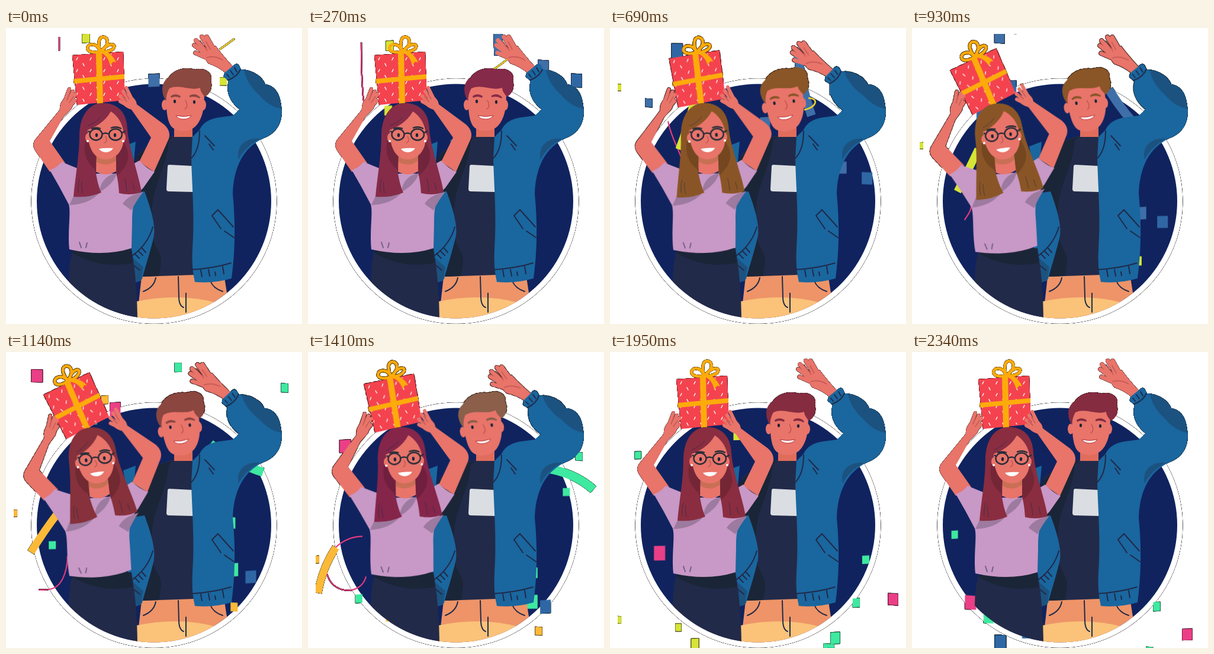
Write an HTML page that moves like this. It is 500 by 500 pixels and loops after 2370 ms.

```html
<!DOCTYPE html>
<html lang="en">
<head>
<meta charset="utf-8">
<title>Celebration</title>
<style>
html, body { margin: 0; width: 100%; height: 100%; overflow: hidden; background: #fff; }
svg { display: block; width: 500px; height: 500px; }
.scene { filter: drop-shadow(0 0 .5px #000) drop-shadow(0 0 .3px #000) drop-shadow(0 0 .2px #000); }

.skin { fill: #e8746a; }
.neck { fill: #e06c5c; }
.chin { fill: #c96f55; }
.crease { fill: none; stroke: #b9504e; stroke-width: 1.2; stroke-linecap: round; }
.navy { fill: #222a49; }
.dark { fill: #1a2537; }
.blue { fill: #1a669e; }
.deep { fill: #1c5280; }
.lilac { fill: #c898c6; }
.plum { fill: #9d7a9f; }
.seam { fill: none; stroke: #1f2a4a; stroke-width: 2; stroke-linecap: round; stroke-linejoin: round; }
.finger { fill: none; stroke: #e8746a; stroke-linecap: round; }
.bow { fill: none; stroke: #fdab0b; stroke-width: 5; stroke-linejoin: round; }
.shade { fill: #000; opacity: .16; }

.lean, .nod, .wave, .herHair, .hisHair, .p, .g, .y, .ribbon { animation: 2370ms infinite; }
.lean, .nod, .wave { animation-timing-function: cubic-bezier(.65, 0, .35, 1); }
.lean { animation-name: lean; }
.nod { animation-name: nod; transform-origin: 303px 178px; }
.wave { animation-name: wave; transform-origin: 425px 125px; }
.torso { --to: rotate(-4.6deg); transform-origin: 160px 375px; }
.head { --to: rotate(-2deg); transform-origin: 168px 245px; }
.armL { --to: rotate(-4.6deg); transform-origin: 86px 234px; }
.armR { --to: rotate(2deg); transform-origin: 238px 234px; }
.gift { --to: translate(-15px, 4px) rotate(-17.4deg); transform-origin: 158px 84px; }

@keyframes lean {
  0%, 20.25%, 69.6%, 100% { transform: none; }
  43%, 46.8% { transform: var(--to); }
}
@keyframes nod {
  0%, 12.6%, 77.2%, 100% { transform: rotate(0deg); }
  27.8%, 62% { transform: rotate(-8deg); }
}
@keyframes wave {
  0%, 12.6%, 42.5%, 77.2%, 100% { transform: rotate(0deg); }
  27.8%, 29.1%, 53%, 62% { transform: rotate(-6.4deg); }
}

/* Colours switch hard */
.herHair, .hisHair, .p, .g, .y { animation-timing-function: step-end; }
.herHair { animation-name: herHair; }
.hisHair { animation-name: hisHair; }
.g { animation-name: green; }
.y { animation-name: yellow; }
.p { color: #ea3f86; }
.b { color: #2f67a4; }
.p, .g, .y, .b { fill: currentColor; }
@keyframes herHair {
  0% { fill: #862c48; } 20% { fill: #8a5526; } 40% { fill: #86313b; }
  55% { fill: #85254a; } 72% { fill: #8a2d40; }
}
@keyframes hisHair {
  0% { fill: #8a4840; } 6% { fill: #862a4a; } 20% { fill: #8a5527; }
  40% { fill: #8b463f; } 55% { fill: #8b5f4a; } 72% { fill: #862c40; }
}
@keyframes green { 0% { color: #3f6fa8; } 40% { color: #3ee9a0; } }
@keyframes yellow { 0% { color: #d6e436; } 40% { color: #fbb938; } 72% { color: #d6e436; } }

.ribbon { fill: none; animation-timing-function: linear; }
.r1 { animation-name: r1; stroke: #e33b7c; stroke-width: 2.2; }
.r2 { animation-name: r2; stroke: currentColor; stroke-width: 13; }
.r3 { animation-name: r3; stroke: currentColor; stroke-width: 15; }
.r4 { animation-name: r4; stroke: #e8cf2c; stroke-width: 2.6; }
@keyframes r1 {
  0% { d: path("M90 15C90 23 90 30 90 38C90 38 90 38 90 38"); }
  11.4% { d: path("M90 24C90 50 91 90 93 115C94 120 94 126 95 130"); }
  29.1% { d: path("M98 157C101 172 106 185 113 200C118 212 122 222 128 235"); }
  48.1% { d: path("M104 345C104 365 98 385 88 394C80 402 65 402 55 402"); }
  59.5% { d: path("M92 311C50 311 20 352 34 380C46 410 90 410 98 379"); }
  80%, 100% { d: path("M120 520C90 520 60 540 60 560C70 590 110 590 120 560"); }
}
@keyframes r2 {
  0%, 11.4% { d: path("M150 -90Q146 -55 140 -15"); }
  29.1% { d: path("M142 125Q132 165 117 205"); }
  48.1% { d: path("M86 274Q66 300 42 338"); }
  59.5% { d: path("M47 330Q24 365 17 407"); }
  80%, 100% { d: path("M-10 430Q-20 460 -20 500"); }
}
@keyframes r3 {
  0% { d: path("M322 -110Q320 -70 320 -30"); }
  11.4% { d: path("M322 -20Q320 15 322 46"); }
  29.1% { d: path("M318 45Q322 95 340 148"); }
  48.1% { d: path("M345 155Q390 190 434 203"); }
  59.5% { d: path("M400 196Q450 203 482 232"); }
  80%, 100% { d: path("M510 380Q540 400 560 440"); }
}
@keyframes r4 {
  0% { d: path("M361 36C370 30 378 24 386 18"); }
  11.4% { d: path("M312 71C320 65 328 60 337 52"); }
  29.1% { d: path("M335 118C353 118 350 133 328 138"); }
  48.1%, 100% { d: path("M345 230C350 235 350 240 340 250"); }
}
</style>
</head>
<body>
<svg viewBox="0 0 500 500">
  <defs>
    <clipPath id="stage"><path d="M13 10H487V500H13Z"/></clipPath>
    <clipPath id="disc"><circle cx="250" cy="292.5" r="198"/></clipPath>
    <pattern id="ticks" width="23" height="20" patternUnits="userSpaceOnUse" patternTransform="translate(115 46)">
      <path d="M6 4l-2 4M15 14l2 4" stroke="#fff" stroke-width="1.4" stroke-linecap="round"/>
    </pattern>
  </defs>
  <g class="scene">
    <circle cx="250" cy="292.5" r="207.3" fill="#fff"/>
    <circle cx="250" cy="292.5" r="198" fill="#10235f"/>

    <g id="confetti" clip-path="url(#stage)">
      <path class="ribbon r1"/>
      <g class="y"><path class="ribbon r2"/></g>
      <g class="g"><path class="ribbon r3"/></g>
      <path class="ribbon r4"/>
    </g>

    <!-- Man -->
    <g clip-path="url(#disc)">
      <path fill="#ee9468" d="M230 412L368 415L373 447L373 500H220Z"/>
      <path fill="#fbc27a" d="M220 462Q290 447 356 464L356 500H220Z"/>
      <path class="seam" d="M291 420L292 453Q292 469 300 472M304 448V480M253 422Q250 438 232 445M345 427Q350 440 366 445"/>
    </g>
    <path class="blue" d="M219 192L198 200L204 235L216 226Z"/>
    <path class="navy" d="M283 182C264 186 240 196 222 214L214 300L230 420L318 417L322 182Z"/>
    <path class="dark" d="M283 184C262 188 238 196 218 222L214 280L234 290L247 325C242 270 272 240 275 190Z"/>
    <path class="dark" d="M248 340C244 365 262 375 262 392Q261 410 258 419L230 420Z"/>
    <path class="blue" d="M234 276C246 308 254 338 249 355C241 388 236 400 230 424L218 430L206 380L208 280Z"/>
    <path class="deep" d="M212 386L232 404L228 427L218 430Z"/>
    <path class="seam" d="M248 336Q240 365 213 385M217 381L225 389M223 376L231 384M229 371L236 379M212 398L226 409"/>
    <path fill="#dadee2" d="M273 234Q273 231 276 231L315 233L316 277L275 276Q271 276 271 272Z"/>

    <path class="blue" d="M315 184L327 172C332 160 345 153 360 151L383 148L396 136L425 100L437 95C455 97 463 112 465 132C469 157 458 176 440 184C408 197 385 225 383 280C388 330 387 380 381 423Q350 432 319 429Q313 405 315 372C319 320 314 265 313 220Z"/>
    <path class="deep" d="M393 222C388 200 404 184 430 187C412 196 400 208 393 222Z"/>
    <path class="seam" d="M327 174Q327 206 313 220M336 182L352 199M343 196L350 206M384 336L358 307L348 317L363 339M369 343L385 354M315 408Q350 406 380 397M329 409L331 420M342 408L344 419M353 412L354 418M366 403L368 415"/>
    <g class="wave">
      <g class="finger">
        <path stroke-width="7.5" d="M352 38L339 15M347 40L331 15M343 44L321 21"/>
        <path stroke-width="7" d="M342 48L318 29M350 55L320 42"/>
      </g>
      <path class="skin" d="M335 38L354 30Q364 44 384 66L372 77Q360 66 342 60Q334 52 335 38Z"/>
      <path class="crease" d="M339 50Q352 46 366 54M345 36L338 23M340 38L328 22"/>
      <path class="blue" d="M368 82L392 62L397 70C415 70 434 82 439 97L445 130L395 138C377 124 371 106 376 90Z"/>
      <path class="deep" d="M402 71C407 98 428 114 446 128L439 97C434 82 418 72 402 71Z"/>
      <path class="blue" d="M368 83Q367 78 371 74L386 62Q391 58 394 64L397 71Q388 84 376 89Z"/>
      <path class="seam" d="M375 88Q391 82 396 70M373 78L377 83M379 72L384 79M386 67L390 74"/>
    </g>
    <path class="deep" d="M424 100L438 95C455 98 464 112 465 136C452 135 440 126 430 116Z"/>
    <path class="neck" d="M284 155H315V184H284Z"/>
    <g class="nod">
      <ellipse class="skin" cx="268" cy="130" rx="5" ry="9"/>
      <ellipse class="skin" cx="333" cy="130" rx="5" ry="9"/>
      <path class="skin" d="M270 98H334C336 125 335 148 322 164C311 177 290 177 280 167C272 158 270 140 270 98Z"/>
      <path class="hisHair" d="M270 123C261 109 262 92 274 84C284 69 303 65 320 70C337 65 351 78 346 88C350 101 344 113 336 116C332 112 328 106 328 101C310 107 294 94 276 102Q271 110 270 123Z"/>
      <g class="hisHair"><path d="M278 115Q286 109 295 115L294 118Q286 114 279 118ZM310 114Q320 109 328 117L327 119Q319 114 310 117Z"/></g>
      <g class="dark"><ellipse cx="285" cy="124" rx="2.1" ry="3"/><ellipse cx="318" cy="125" rx="2.1" ry="3"/></g>
      <path class="crease" d="M303 122Q309 133 302 137"/>
      <path fill="#fff" stroke="#b8343a" stroke-width="1" d="M287 148Q300 151 313 148Q309 154 300 154Q291 154 287 148Z"/>
    </g>

    <!-- Woman -->
    <g clip-path="url(#disc)">
      <path class="navy" d="M114 372C106 394 106 420 106 440V500H222Q222 430 212 372Z"/>
      <path class="dark" d="M114 372H211L214 397Q160 408 112 380Z"/>
    </g>
    <g class="lean torso">
      <g class="lean gift">
        <path fill="#f4434e" d="M112 46L198 40L201 122L120 130Z"/>
        <path fill="url(#ticks)" d="M114 47L196 42L199 120L121 128Z"/>
        <path fill="#fdab0b" d="M152 42L162 41L164 127L154 128ZM114 86L200 78L200 86L115 94Z"/>
        <path class="bow" d="M159 40C131 46 134 25 148 28Q156 30 159 40C152 15 164 11 170 18C175 27 166 34 160 40C174 22 188 27 181 35Q174 41 161 40"/>
        <path fill="#fdab0b" d="M160 37Q178 40 186 58L181 57L176 63Q172 46 160 42Z"/>
      </g>
      <g class="lean armL">
        <path class="finger" stroke-width="6" d="M99 124L107 103M104 126L113 107M107 129L117 112M106 134L116 123"/>
        <path class="skin" d="M74 243L50 208Q43 198 49 189L91 138Q90 127 99 118L112 122Q115 134 107 140L97 150L74 191L100 228Z"/>
        <path class="crease" d="M108 110L103 122M114 116L107 126"/>
      </g>
      <g class="lean armR">
        <path class="finger" stroke-width="6" d="M213 121L203 101M209 123L198 107M206 126L193 115M206 131L193 124"/>
        <path class="skin" d="M203 118L212 115Q220 121 221 129L267 163Q279 174 275 187L250 243L225 226L245 185L212 138Q202 135 198 129Z"/>
        <path class="crease" d="M202 110L208 120M197 116L204 124"/>
      </g>
      <path class="lilac" d="M94 226C112 234 130 241 150 246H186L225 224Q238 238 251 243L232 270C215 286 213 305 213 330L212 372Q165 387 107 374C104 340 110 312 106 298L90 268L74 240Q86 236 94 226Z"/>
      <path class="plum" d="M107 299L116 280H157Q160 250 187 245Q183 262 160 276Q142 298 107 299ZM197 297Q206 282 232 277Q221 290 212 308Z"/>
      <path d="M124 362L127 371M137 363L135 371" class="seam" stroke-width="1" opacity=".5"/>
      <g class="lean head">
        <path class="herHair" d="M160 127C186 125 204 141 205 170C207 202 225 250 229 277Q212 284 191 279C190 262 188 250 184 238H151C153 255 157 270 161 278Q140 287 114 285C117 250 124 216 124 180C125 150 138 129 160 127Z"/>
        <path class="shade" d="M134 190C128 215 140 232 153 240L154 205ZM197 188C210 212 212 228 187 250L184 206Z"/>
        <path class="skin" d="M153 208H186V242Q170 252 152 243Z"/>
        <path class="chin" d="M153 214H186V224Q170 236 153 226Z"/>
        <ellipse class="skin" cx="138" cy="185" rx="4" ry="7"/>
        <ellipse class="skin" cx="198" cy="185" rx="4" ry="7"/>
        <path class="skin" d="M138 172C150 168 168 158 177 141C190 149 200 165 199 185C199 206 186 222 169 222C150 222 138 205 138 172Z"/>
        <path class="seam" style="stroke-width:1;opacity:.6" d="M139 165Q152 160 160 150M122 277Q121 265 124 255M129 279Q127 268 128 260M204 276Q203 264 201 255M217 274L214 262"/>
        <g fill="none" stroke="#272d39" stroke-width="2.4">
          <ellipse cx="152" cy="180" rx="10.5" ry="9.5"/>
          <ellipse cx="185" cy="180" rx="11" ry="9.5"/>
          <path d="M163 179Q168 176 173 179M139 174L143 177M202 174L196 177M144 170Q152 167 160 170M177 169Q186 165 195 170"/>
        </g>
        <g class="dark"><ellipse cx="153" cy="181" rx="2.2" ry="3.2"/><ellipse cx="184" cy="181" rx="2.2" ry="3.2"/></g>
        <path class="crease" d="M168 183Q173 192 166 194"/>
        <path fill="#fff" d="M157 204Q168 202 181 203Q177 210 168 210Q160 209 157 204Z"/>
        <g fill="#fff"><circle cx="138" cy="191" r="2"/><circle cx="198" cy="191" r="2"/></g>
      </g>
    </g>
  </g>
</svg>
<script>
const LOOP = 2370, STEPS = 48;
const V0 = 0.507, DRAG = 0.00013, V_END = 0.15;
const SLOWED = (V0 - V_END) / (2 * DRAG);
const layer = document.getElementById('confetti');

// kind, launch time (ms), x at loop start, x at loop end, width, speed
const pieces = [
  ['b', 43, 466, 357, 18], ['g', 95, 402, 363, 18], ['y', -230, 367, 405, 12],
  ['g', -226, 250, 254, 19], ['y', -74, 135, 140, 13], ['y', 170, 137, 145, 13],
  ['b', 572, 98, 150, 19], ['g', 426, 46, 113, 12, 1.17], ['y', 437, 14, 14, 10],
  ['g', 295, 262, 262, 17], ['y', 931, 150, 185, 12], ['p', 895, 170, 200, 18],
  ['g', 1048, 285, 297, 12], ['g', 975, 525, 412, 12], ['g', 900, 490, 400, 12, 1.14],
  ['p', 1018, 8, 100, 19], ['p', 660, 545, 464, 17], ['y', 1600, 214, 214, 11],
  ['g', 450, 378, 381, 16, 1.07], ['y', 350, 150, 108, 10], ['g', 860, 160, 129, 17],
  ['g', 1520, -78, 74, 11], ['b', 680, 150, 195, 17]
];

// Drag slows each piece until it reaches a steady speed
function fall(age) {
  const a = Math.min(age, SLOWED);
  return V0 * a - DRAG * a * a + V_END * Math.max(0, age - SLOWED);
}

pieces.forEach(([kind, start, x0, x1, w, speed = 1], i) => {
  const rect = document.createElementNS('http://www.w3.org/2000/svg', 'rect');
  const h = w * 1.3;
  const attrs = { class: kind, x: -w / 2, y: -h / 2, width: w, height: h };
  for (const name in attrs) rect.setAttribute(name, attrs[name]);
  layer.prepend(rect);

  const frames = Array.from({ length: STEPS + 1 }, (_, k) => {
    const u = k / STEPS, age = u * LOOP - start;
    const x = x0 + (x1 - x0) * u;
    const y = -20 + speed * fall(age);
    const turn = age / 260 + i;
    return {
      transform: `translate(${x}px, ${y}px) skewY(${4 * Math.sin(turn)}deg) scaleY(${0.93 + 0.07 * Math.cos(turn)})`
    };
  });
  rect.animate(frames, { duration: LOOP, iterations: Infinity });
});
</script>
</body>
</html>
```
